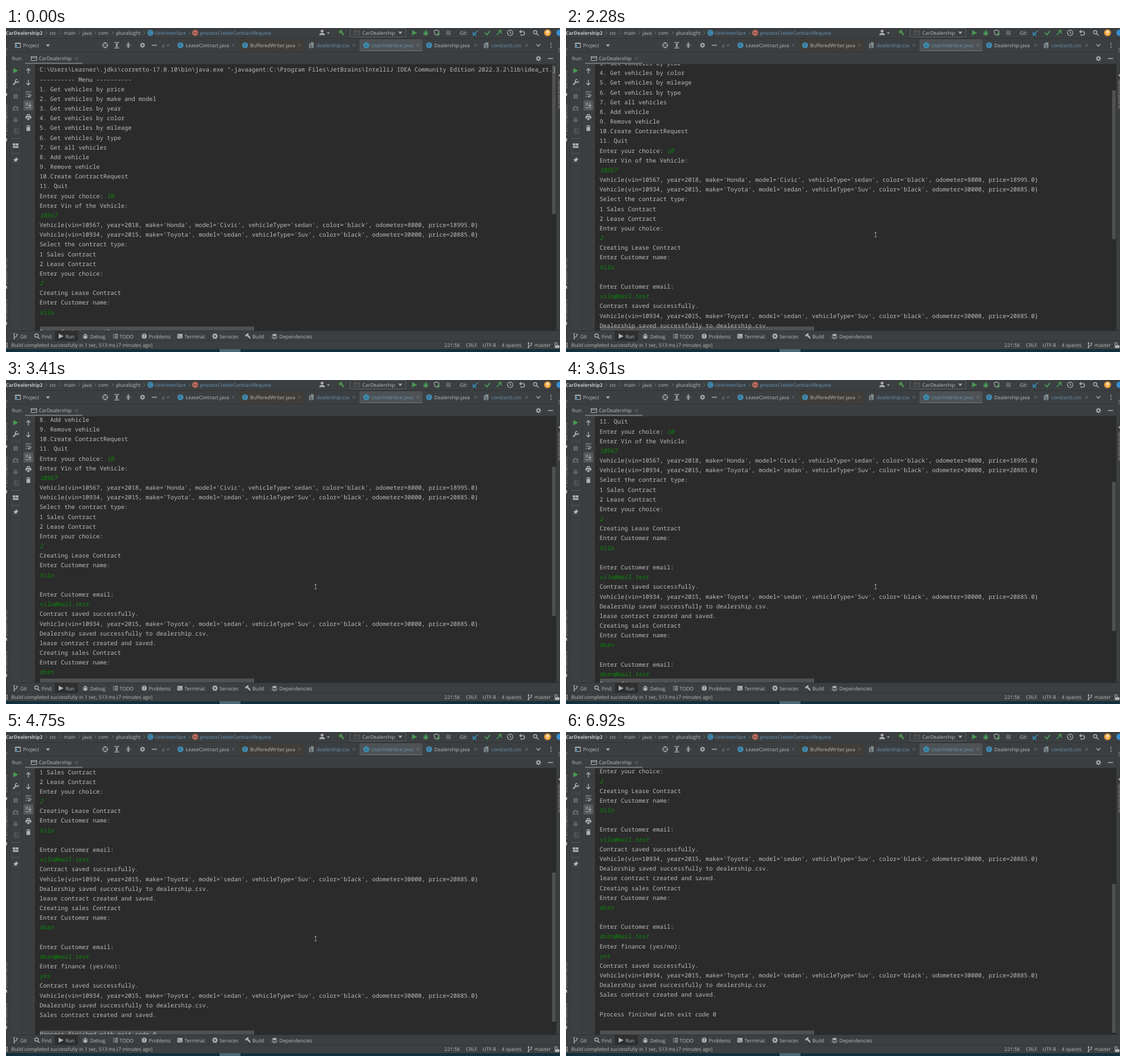
An HTML page that plays this animation: 978 by 573 pixels, repeating every 8.26 s.

```html
<!DOCTYPE html>
<html lang="en">
<head>
<meta charset="utf-8">
<title>Run console</title>
<style>
  html, body { margin: 0; width: 100%; height: 100%; overflow: hidden; background: #3c3f41; }
  svg { display: block; }
  text { white-space: pre; font: 8.75px "Open Sans", "Noto Sans", sans-serif; text-rendering: geometricPrecision; }
  .mono text { font: 10.41px "Noto Sans Mono", "DejaVu Sans Mono", monospace; }
  .mono .input { font-style: italic; fill: #0a8a0a; }
</style>
</head>
<body>
<svg id="stage" width="978" height="573" viewBox="0 0 978 573"></svg>
<script>
const GREY = '#afb1b3', DIM = '#606365', GREEN = '#499c54', BLUE = '#6897bb', EDGE = '#323232';
const LOOP = 8260, PITCH = 17.17;
let out = '';

const rect = (x, y, w, h, fill, more = '') =>
  out += `<rect x="${x}" y="${y}" width="${w}" height="${h}" fill="${fill}" ${more}/>`;
const text = (x, y, s, fill = '#bbb', more = '') =>
  out += `<text x="${x}" y="${y + 3.2}" fill="${fill}" ${more}>${s}</text>`;
const stroke = (x, y, d, color = GREY, width = 1.2) =>
  out += `<path transform="translate(${x} ${y})" d="${d}" fill="none" stroke="${color}" stroke-width="${width}"/>`;
const solid = (x, y, d, color = GREY) =>
  out += `<path transform="translate(${x} ${y})" d="${d}" fill="${color}" fill-rule="evenodd"/>`;
const badge = (x, y, letter, fill) => {
  out += `<circle cx="${x}" cy="${y}" r="5.2" fill="${fill}"/>`;
  text(x, y - .6, letter, '#27323a', 'text-anchor="middle" style="font-size:7.5px"');
};

// Icon outlines, centred on 0,0
const play = 'M-4-4.5L4.5 0L-4 4.5Z';
const caret = 'M-3.5-2H3.5L0 2.2Z';
const cross = 'M-2.3-2.3L2.3 2.3M2.3-2.3L-2.3 2.3';
const chevron = 'M-1.5-3L1.5 0L-1.5 3';
const down = 'M0-4.5V4M-3.5 .8L0 4.2L3.5 .8';
const up = 'M0 4.5V-4M-3.5-.8L0-4.2L3.5-.8';
const square = 'M-4-4H4V4H-4Z';
const ring = r => `M${-r} 0a${r} ${r} 0 1 0 ${2 * r} 0a${r} ${r} 0 1 0 ${-2 * r} 0`;
const bug = 'M-2.2-2a2.2 2.2 0 0 1 4.4 0ZM-2.8-1.2H2.8V2a2.8 2.8 0 0 1-5.6 0ZM-5-2.5l2 1v1l-2-1ZM5-2.5l-2 1v1l2-1ZM-5 1h2v1h-2ZM3 1h2v1h-2ZM-4.5 4.2l2-1.2v1ZM4.5 4.2l-2-1.2v1Z';
const hammer = 'M-5-1.5L-1-5L2-4.5L.5-2.5L5 2.8L3.2 4.6L-1.5-.5L-3.5 1Z';
const branch = 'M-2.5-4V4M2.5-3V-1Q2.5 1-2.5 1.5';
const lens = 'M-4.2-1a3 3 0 1 0 6 0a3 3 0 1 0-6 0M1 1.3L4.5 4.8';
const page = 'M-1-5H4V5H-4V-2H-1ZM-2-5V-3H-4Z';
const windows = 'M-4.5-3.5H5V3.5H-4.5ZM-4.5-1.5H5';
const gear = [0, 45, 90, 135].map(a => {
  const x = 4.4 * Math.cos(a * Math.PI / 180), y = 4.4 * Math.sin(a * Math.PI / 180);
  return `M${x * .55} ${y * .55}L${x} ${y}M${-x * .55} ${-y * .55}L${-x} ${-y}`;
}).join('') + ring(2.5);

function topBar() {
  text(64.5, 8.5, 'CarDealership2', '#c4c4c4', 'text-anchor="end" style="font-weight:bold;font-size:8.5px"');
  [71, 96, 129, 157, 188, 244, 324].forEach(x => stroke(x, 8.5, chevron, '#777', .9));
  [[77, 'src'], [102, 'main'], [135, 'java'], [163, 'com'], [194.5, 'pluralsight']].forEach(([x, s]) => text(x, 8.5, s));
  badge(255, 8.5, 'C', '#3f8fb3');
  text(262.5, 8.5, 'UserInterface', BLUE);
  badge(334, 8.5, 'm', '#c9705f');
  text(342, 8.5, 'processCreateContractRequest', BLUE);

  solid(558, 8, 'M-2.5-2.5a2.5 2.5 0 0 1 5 0a2.5 2.5 0 0 1-5 0M-5 4.5Q-5 .8 0 .8Q5 .8 5 4.5Z');
  solid(569, 9, 'M-2.5-1.2H2.5L0 1.6Z');
  solid(592, 8.5, hammer, GREEN);
  rect(607.5, .5, 98, 15.5, '#3c3f41', 'stroke="#606365" rx="1"');
  stroke(619, 8.5, windows, DIM);
  text(629, 8.5, 'CarDealership');
  solid(696, 8.5, caret);
  solid(721, 8.5, play, GREEN);
  solid(741, 8.5, bug, GREEN);
  stroke(760, 8, 'M0-4.5L4-3V0Q4 3 0 4.5Q-4 3-4 0V-3Z');
  solid(764, 11, 'M-2.5-3L3 0L-2.5 3Z', GREEN);
  solid(781, 8.5, square, DIM);
  text(801, 8.5, 'Git:');
  stroke(829, 8.5, 'M4-4L-3.5 3.5M-4-1.5V4H1.5', '#3592c4', 1.7);
  stroke(850, 8.5, 'M-4.5 0L-1 3.5L4.5-3.5', GREEN, 1.9);
  stroke(870, 8.5, 'M-4 4L3.5-3.5M-1.5-4H4V1.5', GREEN, 1.7);
  stroke(890, 8.5, ring(4.8) + 'M0-3V.5H2.5');
  stroke(911, 8.5, 'M-4-2H1.5a3 3 0 0 1 0 6H-3M-1.5-4.8L-4.2-2L-1.5 .8', GREY, 1.4);
  stroke(935.5, 8.5, lens, GREY, 1.4);
  solid(956, 8.5, ring(6), '#eda23b');
  stroke(956, 8.5, 'M0 3.2V-3M-2.5-.6L0-3.2L2.5-.6', '#fff', 1.3);
  solid(977, 8.5, ring(5.5), '#3a8fd0');
  rect(0, 18, 978, 1, EDGE);
}

function tabRow() {
  rect(411, 20, 115, 21, '#3f3d36');
  rect(624, 20, 111, 21, '#4e5254');
  rect(624, 39.5, 111, 1.5, '#62686c');
  stroke(21, 30.5, 'M-4.5-4H4.5V4H-4.5ZM-4.5-3H4.5', GREY);
  rect(17.5, 29, 2.5, 4.5, '#3592c4');
  text(30, 30.5, 'Project');
  solid(74, 31, caret);
  stroke(175, 30.5, ring(4.3) + 'M0-5.5V-1.5M0 1.5V5.5M-5.5 0H-1.5M1.5 0H5.5');
  stroke(195.5, 30.5, 'M-4.5-4.8H4.5M-4.5 4.8H4.5M0-3V3M-2-1L0-3L2-1M-2 1L0 3L2 1');
  stroke(216, 30.5, 'M-4.5 0H4.5M0-5V-1.5M-2-3.2L0-1.4L2-3.2M0 5V1.5M-2 3.2L0 1.4L2 3.2');
  stroke(241, 30.5, gear, GREY, 1.6);
  stroke(262, 30.5, 'M-4.5 0H4.5', GREY, 1.5);
  text(275, 30.5, 'a', '#888');
  [[308, 'LeaseContract.java'], [422, 'BufferedWriter.java'], [636, 'UserInterface.java', BLUE], [747, 'Dealership.java']]
    .forEach(([x, s, c]) => { badge(x, 30.5, 'C', '#3f8fb3'); text(x + 9, 30.5, s, c); });
  [[539, 'dealership.csv'], [847.5, 'contracts.csv']].forEach(([x, s]) => {
    solid(x, 30.5, page, '#87939a');
    stroke(x, 31, 'M-2.5-.5H2.5M-2.5 1.5H2.5M-2.5 3.3H2.5', '#3c3f41', .8);
    text(x + 9.5, 30.5, s, BLUE);
  });
  [286, 401, 518, 614, 727, 829, 919].forEach(x => stroke(x, 30.5, cross, '#787b7d', .9));
  stroke(940, 30.5, 'M-3.5-1.7L0 1.8L3.5-1.7', GREY, 1.4);
  solid(962, 30.5, 'M-.8-4.4h1.6v1.6h-1.6ZM-.8-.8h1.6v1.6h-1.6ZM-.8 2.8h1.6v1.6h-1.6Z');
  rect(0, 42, 978, 1, EDGE);
}

function runHeader() {
  text(10.5, 54, 'Run:');
  stroke(49, 54, windows);
  text(58, 54, 'CarDealership');
  stroke(124.5, 54, cross, '#787b7d', .9);
  rect(34, 61.5, 101, 2, '#747a80');
  stroke(940, 54, gear, GREY, 1.6);
  stroke(961, 54, 'M-4.5 0H4.5', GREY, 1.5);
}

function sideBars() {
  rect(6, 43, 1, 492, EDGE);
  rect(28, 65, 1, 470, EDGE);
  solid(17, 75.5, play, GREEN);
  stroke(17, 96, 'M-4.5 4.5L.5-.5', GREY, 2.4);
  stroke(19, 94, 'M.5-3A2.7 2.7 0 1 0 3-.2', GREY, 1.9);
  solid(17, 121, square, DIM);
  solid(17, 142, 'M-5-3H-2.5L-1.5-4.5H1.5L2.5-3H5V4H-5ZM-2 .5a2 2 0 1 0 4 0a2 2 0 1 0-4 0', DIM);
  solid(17, 162, bug, DIM);
  stroke(17, 182, 'M-2-2V-4.5H4.5V4.5H-2V2M-5.5 0H1.5M-1-2.5L1.5 0L-1 2.5', DIM);
  solid(17, 208, 'M-5-4H-.5V0H-5ZM.5-4H5V0H.5ZM-5 1H5V4H-5Z');
  solid(17, 233.5, 'M1-5L5-1L3.5-.5L1.5 2L1 4L-1.3 1.8L-5 5L-1.9 1.2L-4-1L-2-1.5L.5-3.5Z');
  [108, 195, 221].forEach(y => rect(9, y, 16, 1, '#515151'));

  stroke(39.5, 76, up, GREY, 1.4);
  stroke(39.5, 96.5, down, GREY, 1.4);
  stroke(39.5, 117, 'M-5-4H5M-5 0H2.5a2 2 0 0 1 0 4H0M1.8 2L-.2 4L1.8 6M-5 4H-2');
  rect(31, 128, 17, 18, '#55595c', 'rx="2"');
  stroke(39.5, 137, 'M-5-4H0M-5-1H0M-5 4H5M2.7-5V1.5M.5-.5L2.7 1.7L5-.5');
  solid(39.5, 157.5, 'M-3-5H3V-3H-3ZM-5-2H5V3H3V1H-3V3H-5ZM-2 2H2V5H-2Z');
  solid(39.5, 177, 'M-4-4H-1.5V-5H1.5V-4H4V-3H-4ZM-3.3-2H3.3V5H-3.3Z');

  const rotated = (x, y, deg, s) =>
    out += `<text transform="translate(${x} ${y}) rotate(${deg})" fill="#a0a2a4">${s}</text>`;
  [[49, 'Pro'], [108, 'Commit'], [190, 'Pull Requests'], [453, 'Bookmarks'], [517, 'Structure']]
    .forEach(([y, s]) => rotated(1.5, y, -90, s));
  [115, 195, 456, 520].forEach(y => rect(0, y, 2, 5, GREY));
  rect(971, 43, 1, 492, EDGE);
  rotated(975, 35, 90, 'm');
  rotated(975, 81, 90, '●');
  rotated(975, 91, 90, 'Notifications');
}

function consoleText() {
  const suv = "Vehicle{vin=10934, year=2015, make='Toyota', model='sedan', vehicleType='Suv', color='black', odometer=30000, price=20885.0}";
  const saved = `Contract saved successfully.\n${suv}\nDealership saved successfully to dealership.csv.`;
  // ">" marks what the user typed
  const log = String.raw`C:\Users\Learner\.jdks\corretto-17.0.10\bin\java.exe "-javaagent:C:\Program Files\JetBrains\IntelliJ IDEA Community Edition 2022.3.2\lib\idea_rt.jar
---------- Menu ----------
1. Get vehicles by price
2. Get vehicles by make and model
3. Get vehicles by year
4. Get vehicles by color
5. Get vehicles by mileage
6. Get vehicles by type
7. Get all vehicles
8. Add vehicle
9. Remove vehicle
10.Create ContractRequest
11. Quit
Enter your choice: >10
Enter Vin of the Vehicle:
>10567
Vehicle{vin=10567, year=2018, make='Honda', model='Civic', vehicleType='sedan', color='black', odometer=8000, price=18995.0}
${suv}
Select the contract type:
1 Sales Contract
2 Lease Contract
Enter your choice:
>2
Creating Lease Contract
Enter Customer name:
>Vilo

Enter Customer email:
>vilo@mail.test
${saved}
lease contract created and saved.
Creating sales Contract
Enter Customer name:
>dorn

Enter Customer email:
>dorn@mail.test
Enter finance (yes/no):
>yes
${saved}
Sales contract created and saved.

Process finished with exit code 0`;
  rect(51, 64, 920, 471, '#2b2b2b');
  out += '<clipPath id="pane"><rect x="51" y="64" width="919" height="471"/></clipPath>' +
    '<g class="mono" clip-path="url(#pane)"><g id="log">';
  log.split('\n').forEach((row, i) => {
    const [printed, typed] = row.split('>');
    text(59.3, 74.2 + i * PITCH, printed + (typed ? `<tspan class="input">${typed}</tspan>` : ''));
  });
  out += '</g></g>';
  rect(60, 528, 378, 7, '#a6a6a6', 'opacity=".3"');
  rect(964, 65.5, 6.5, 263.5, '#a6a6a6', 'opacity=".3" id="thumb"');
}

function bottomBars() {
  rect(0, 535, 978, 1, EDGE);
  rect(86, 536, 41, 17, '#2d2f30');
  [[25, 'Git'], [63, 'Find'], [105, 'Run'], [148.5, 'Debug'], [200.5, 'TODO'], [252, 'Problems'], [315, 'Terminal'],
   [377, 'Services'], [435, 'Build'], [482.5, 'Dependencies']].forEach(([x, s]) => text(x, 545.5, s));
  const git = (x, y) => {
    stroke(x, y, branch);
    [[-2.5, -4], [-2.5, 4], [2.5, -3]].forEach(([a, b]) => solid(x + a, y + b, ring(1.3)));
  };
  git(17, 545);
  stroke(55, 545, lens, GREY, 1.4);
  solid(97, 545, play);
  solid(140, 545, bug);
  stroke(193, 545, 'M-4-3H-2.5M-1-3H4.5M-4 0H-2.5M-1 0H4.5M-4 3H-2.5M-1 3H4.5', GREY, 1.4);
  solid(244, 545, ring(4.5));
  stroke(244, 545, 'M0-2.7V.7M0 1.7V3', '#3c3f41', 1.3);
  solid(307, 545, 'M-4.5-4H4.5V4H-4.5Z');
  stroke(307, 545, 'M-3-2L-1 0L-3 2M0 2.2H3', '#3c3f41', 1);
  solid(369, 545, 'M-2.5-4.5H2.5L5 0L2.5 4.5H-2.5L-5 0ZM-1.5-2.5V2.5L2.5 0Z');
  solid(427, 545, hammer);
  solid(474, 545, 'M-5-2L0-4.5L5-2L0 .5ZM-5 0L0 2.5L5 0V1L0 3.4L-5 1ZM-5 2L0 4.5L5 2V3L0 5.4L-5 3Z');

  rect(0, 553, 978, 1, EDGE);
  stroke(0, 561, 'M-4-4H2V4H-4');
  [[9.5, 'Build completed successfully in 1 sec, 513 ms (7 minutes ago)'], [774, '221:56'], [812, 'CRLF'],
   [841.5, 'UTF-8'], [875, '4 spaces'], [933, 'master']].forEach(([x, s]) => text(x, 561, s));
  git(925, 561);
  solid(973, 562, 'M-4-1H4V4H-4Z');
  stroke(971, 560, 'M-2 1V-2a2 2 0 0 1 4 0V1');
  rect(0, 568, 978, 5, '#12303f');
  rect(377, 568, 37, 5, '#4b6675');
}

topBar();
tabRow();
runHeader();
sideBars();
consoleText();
bottomBars();
out += `<g id="cursor">
  <path id="beam" d="M-2-4H2M0-4V4M-2 4H2" fill="none" stroke="#b4b4b4" stroke-width=".8"/>
  <path id="arrow" d="M0 0V10L2.4 7.8L4 11.3L5.6 10.5L4 7.2H7.2Z" fill="#fff" stroke="#111" stroke-width=".7"/>
</g>`;

const $ = id => document.getElementById(id);
$('stage').innerHTML = out;

// Bursts of held values: start time, step length, values
const scrolls = [
  [0, 65, 0],
  [1810, 65, 17, 33, 46, 51.5],
  [2210, 65, 62, 80, 96, 103],
  [2810, 65, 122, 143, 154.5],
  [3410, 65, 158, 177, 196, 206],
  [4020, 65, 222, 241, 255, 268, 286, 302, 309],
  [4750, 65, 329, 350, 360.5],
  [5300, 65, 364.5],
];
const moves = [
  [0, 65, null],
  [110, 65, [914, 562], [880, 537], [820, 505], [750, 470], [690, 443], [640, 424], [612, 411], [599, 406]],
  [930, 65, [572, 388], [550, 372], [538, 366], [546.5, 365.5]],
  [6230, 76, [550, 362], [566, 358], [602, 366], [660, 392], [728, 428], [800, 468], [868, 506], [922, 540], [956, 557], null],
];

function sample(bursts, t) {
  const [start, step, ...values] = bursts.filter(b => b[0] <= t).pop();
  return values[Math.min(values.length - 1, Math.floor((t - start) / step))];
}

function draw() {
  const t = performance.now() % LOOP;
  const offset = sample(scrolls, t), at = sample(moves, t);
  $('log').setAttribute('transform', `translate(0 ${-offset})`);
  $('thumb').setAttribute('y', 65.5 + offset * .557);
  $('cursor').setAttribute('display', at ? 'inline' : 'none');
  if (at) {
    const inPane = at[1] < 535;
    $('cursor').setAttribute('transform', `translate(${at})`);
    $('beam').setAttribute('display', inPane ? 'inline' : 'none');
    $('arrow').setAttribute('display', inPane ? 'none' : 'inline');
  }
  requestAnimationFrame(draw);
}
draw();
</script>
</body>
</html>
```
